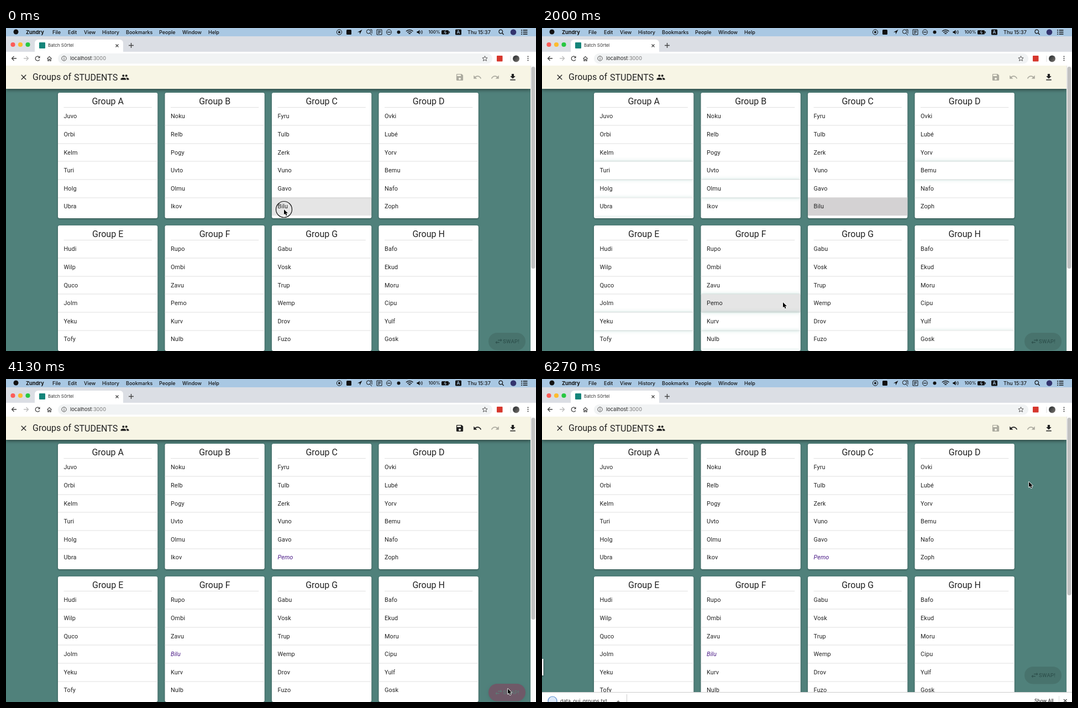
An HTML page with a canvas that plays this animation: 959x584 px, repeating every 6.34 s.

```html
<!DOCTYPE html>
<html lang="en">
<head>
<meta charset="utf-8">
<title>Group swapper</title>
<style>
html, body { margin: 0; width: 100%; height: 100%; overflow: hidden; }
canvas { display: block; }
</style>
</head>
<body>
<canvas id="stage" width="959" height="584"></canvas>
<script>
const LOOP = 6340;
const SELECT_A = 200, SELECT_B = 2350, SWAP = 4000, DOWNLOAD = 5130, SHELF = 5750, SAVE = 5950;
const UI = 'Inter, "Open Sans", sans-serif', APP = 'Roboto, sans-serif';
const INK = '#222', OFF = 'rgba(0,0,0,.3)';
const ctx = document.getElementById('stage').getContext('2d');

const groups = [
  'Juvo Orbi Kelm Turi Holg Ubra', 'Noku Relb Pogy Uvto Olmu Ikov',
  'Fyru Tulb Zerk Vuno Gavo Bilu', 'Ovki Lubé Yorv Bemu Nafo Zoph',
  'Hudi Wilp Quco Jolm Yeku Tofy', 'Rupo Ombi Zavu Pemo Kurv Nulb',
  'Gabu Vosk Trup Wemp Drov Fuzo', 'Bafo Ekud Moru Cipu Yulf Gosk'
].map(s => s.split(' '));
const glowing = { 0: [3, 5], 1: [4], 3: [3], 4: [4], 5: [3, 4, 5], 7: [5] };
const pickA = [2, 5], pickB = [5, 3];

// time, x, y, linear flag for the segment ending here
const track = [
  [0, 503, 328], [250, 503, 328], [730, 501, 329], [1000, 501, 329], [1750, 436, 496],
  [2500, 436, 496], [3010, 775, 466], [3095, 850, 478, 1], [3130, 865, 488, 1], [3500, 908, 560],
  [4250, 908, 560], [4900, 917, 88], [5300, 917, 88], [5600, 904, 83], [5800, 821, 88],
  [5990, 821, 88], [6270, 881, 186], [LOOP, 881, 186]
];
const presses = [[0, 220], [2180, 2360], [3850, 4010], [4980, 5150], [5830, 5960]];

const icons = {
  close: 'M19 6.4L17.6 5 12 10.6 6.4 5 5 6.4 10.6 12 5 17.6 6.4 19 12 13.4 17.6 19 19 17.6 13.4 12z',
  people: 'M5 8a3 3 0 1 0 6 0a3 3 0 1 0-6 0zM13 8a3 3 0 1 0 6 0a3 3 0 1 0-6 0zM8 13c-2.3 0-7 1.2-7 3.5V19h14v-2.5c0-2.3-4.7-3.5-7-3.5zM16 13l-1 .1c1.2.8 2 1.9 2 3.4V19h6v-2.5c0-2.3-4.7-3.5-7-3.5z',
  save: 'M17 3H5a2 2 0 0 0-2 2v14a2 2 0 0 0 2 2h14a2 2 0 0 0 2-2V7zM12 19a3 3 0 1 1 0-6a3 3 0 1 1 0 6zM15 9H5V5h10z',
  undo: 'M12.5 8c-2.6 0-5 1-6.9 2.6L2 7v9h9l-3.6-3.6c1.4-1.2 3.1-1.9 5.1-1.9 3.5 0 6.5 2.3 7.6 5.5l2.4-.8C21 11 17.1 8 12.5 8z',
  load: 'M19 9h-4V3H9v6H5l7 7zM5 18v2h14v-2z',
  swap: 'M7 11l-4 4 4 4v-3h7v-2H7zM21 9l-4-4v3h-7v2h7v3z'
};

const clamp = v => Math.max(0, Math.min(1, v));
const mix = (a, b, k) => a + (b - a) * k;

function cursorAt(t) {
  const i = Math.max(1, track.findIndex(p => p[0] >= t));
  const [t0, x0, y0] = track[i - 1], [t1, x1, y1, linear] = track[i];
  let k = clamp((t - t0) / (t1 - t0));
  if (!linear) k = k * k * (3 - 2 * k);
  return [mix(x0, x1, k), mix(y0, y1, k)];
}

// share of the last moments the pointer spent inside an area, used as a fade
function hover(t, inside) {
  let n = 0;
  for (let d = 0; d < 150; d += 30) if (inside(...cursorAt(Math.max(0, t - d)))) n++;
  return n / 5;
}

function text(s, x, yMid, size, color = INK, family = UI, style = '', align = 'left') {
  ctx.font = `${style} ${size}px ${family}`;
  ctx.textAlign = align;
  ctx.fillStyle = color;
  ctx.fillText(s, x, yMid + size * .36);
}
function box(x, y, w, h, color, r = 0) {
  ctx.fillStyle = color;
  ctx.beginPath();
  ctx.roundRect(x, y, w, h, r);
  ctx.fill();
}
function dot(x, y, r, color) {
  ctx.fillStyle = color;
  ctx.beginPath();
  ctx.arc(x, y, r, 0, 7);
  ctx.fill();
}
function line(d, color = '#333', width = 1.2) {
  ctx.strokeStyle = color;
  ctx.lineWidth = width;
  ctx.stroke(new Path2D(d));
}
function shape(d, color) {
  ctx.fillStyle = color;
  ctx.fill(new Path2D(d));
}
function ring(x, y, r, color, width) {
  line(`M${x - r} ${y}a${r} ${r} 0 1 0 ${2 * r} 0a${r} ${r} 0 1 0 ${-2 * r} 0`, color, width);
}
function icon(name, x, y, color, size = 16.3, flip = 1) {
  ctx.save();
  ctx.translate(x, y);
  ctx.scale(flip * size / 24, size / 24);
  ctx.translate(-12, -12);
  ctx.fillStyle = color;
  ctx.fill(new Path2D(icons[name]), 'evenodd');
  ctx.restore();
}
function shadow(color, blur, dy = 0) {
  ctx.shadowColor = color;
  ctx.shadowBlur = blur;
  ctx.shadowOffsetY = dy;
}

function menuBar() {
  box(0, 0, 959, 15, '#a9c8e3');
  dot(18, 7, 4.5, '#111');
  text('Zundry', 36, 7.5, 9.2, '#111', UI, '700');
  [['File', 84], ['Edit', 112], ['View', 141], ['History', 174], ['Bookmarks', 217],
   ['People', 277], ['Window', 319], ['Help', 366]].forEach(([s, x]) => text(s, x, 7.5, 9, '#111', UI, '500'));
  ring(603, 7.5, 4.6, '#111', 1);
  dot(603, 7.5, 2, '#111');
  box(616, 3, 9, 9, '#111', 1.5);
  shape('M644.5 3L636 7.5h4v4z', '#111');
  ring(656, 6.5, 3.6, '#111', 1);
  line('M658 9l4 4M659 3h3v7', '#111', 1);
  line('M671 3h9v9h-9zM673 5.5h5M673 7.5h5M673 9.5h3', '#111', 1);
  ring(693, 7.5, 4.5, '#111', 1);
  line('M690 7.5h6', '#111');
  dot(710.5, 7.5, 3, '#111');
  line('M724 6a9 9 0 0 1 12.5 0M726.2 8.3a6 6 0 0 1 8 0M728.4 10.4a3 3 0 0 1 3.6 0', '#111', 1.4);
  shape('M743.5 6h2l3-2.6v8.2l-3-2.6h-2z', '#111');
  line('M750 5.5q1.6 2 0 4M752 4q3 3.5 0 7', '#111', 1);
  text('100%', 764.5, 7.5, 7.8, '#111', UI, '500');
  box(788, 4, 13, 7.5, '#111', 1.5);
  box(801.5, 6, 1.5, 3.5, '#111');
  line('M795.5 4.5l-2.5 3.5h3.5l-2 3', '#a9c8e3', 1);
  box(813, 2.5, 11, 10, '#111', 1.5);
  text('A', 818.5, 7.5, 8, '#a9c8e3', UI, '600', 'center');
  text('Thu 15:37', 835, 7.5, 9, '#111', UI, '500');
  ring(895.3, 6.5, 3.3, '#111', 1.2);
  line('M897.6 9l3 3', '#111', 1.4);
  dot(918, 7.5, 5.3, '#33346e');
  line('M932 4h2M935.500 4h8M932 7.500h2M935.500 7.500h8M932 11h2M935.500 11h8', '#111', 1.4);
}

function browser() {
  box(0, 15, 959, 29, '#dbdee4');
  ['#fc5b57', '#fdbc2e', '#28c840'].forEach((c, i) => dot(12.5 + 13.5 * i, 30, 4.1, c));
  box(52, 21, 160, 30, '#fff', 6);
  box(0, 43, 959, 25, '#fff');
  box(60, 26, 11, 11, '#14857a', 1);
  text('Batch S0rtel', 76, 31.5, 8, '#333');
  line('M198.500 29.500l5 5m0-5l-5 5', '#444');
  line('M222 31.500h9M226.500 27v9', '#444', 1.4);
  line('M19 55h-8.500m4-4l-4 4 4 4', '#444', 1.3);
  line('M32 55h8.500m-4-4l4 4-4 4', '#bbb', 1.3);
  line('M60.800 57a4 4 0 1 1-.8-4.700', '#444', 1.3);
  shape('M61.500 50.500v4h-4z', '#444');
  line('M74.500 55.500l4-4 4 4M75.800 55v4.500h1.700v-3h2v3h1.700V55', '#444', 1.1);
  box(94, 46, 786, 18.500, '#f1f3f4', 9.200);
  ring(105, 55, 4.200, '#555', 1);
  line('M105 54.500v3M105 52.300v1.200', '#555', 1.1);
  text('localhost', 116, 55, 9.2, '#222');
  text(':3000', 116 + ctx.measureText('localhost').width, 55, 9.2, '#777');
  line('M866.500 50.700l1.300 3 3.300.3-2.500 2.200.8 3.200-2.900-1.700-2.900 1.700.8-3.200-2.500-2.200 3.300-.3z', '#555', 1);
  box(888, 50, 10.500, 10.500, '#d6362c', 1);
  const g = ctx.createLinearGradient(917, 50, 929, 61);
  g.addColorStop(0, '#262a2d');
  g.addColorStop(1, '#77736f');
  dot(923, 55.500, 6, g);
  line('M913 50v11', '#ddd', 1);
  [51.500, 55, 58.500].forEach(y => dot(944.500, y, 1.1, '#444'));
}

function toolbar(t) {
  shadow('rgba(0,0,0,.5)', 6, 2);
  box(0, 68, 949, 42, '#f7f5e5');
  shadow('transparent', 0);
  icon('close', 32, 89, INK);
  text('Groups of', 48, 88, 16, INK, APP);
  text('STUDENTS', 123, 89, 16, INK, APP);
  icon('people', 215, 89, INK);
  const changed = t >= SWAP, canSave = changed && t < SAVE;
  [['save', 821, canSave], ['undo', 853, changed], ['undo', 885, false, -1], ['load', 917, true]]
    .forEach(([name, x, on, flip]) => {
      const h = on ? hover(t, (cx, cy) => Math.hypot(cx - x, cy - 89) < 16.300) : 0;
      if (h) dot(x, 89, 16.300, `rgba(0,0,0,${.1 * h})`);
      if (name === 'load' && t > DOWNLOAD && t < SAVE - 100) {
        const r = 10 * clamp((t - DOWNLOAD) / 250) + Math.sin((t - 5600) / 400);
        dot(x, 89, Math.max(0, r), 'rgba(0,0,0,.2)');
      }
      icon(name, x, 89, on ? INK : OFF, 16.300, flip);
    });
}

function card(g, t) {
  const x = 94 + 193.500 * (g % 4), y = g < 4 ? 117 : 357, w = 180.300, rowH = 32.600;
  const rowY = i => y + 26.600 + rowH * i;
  const is = (p, i) => p[0] === g && p[1] === i;
  shadow('rgba(0,0,0,.4)', 3, 1);
  box(x, y, w, 227, '#fff', 3);
  shadow('transparent', 0);
  text('Group ' + 'ABCDEFGH'[g], x + w / 2, y + 15, 16, INK, APP, '', 'center');
  box(x + 10.500, y + 26, w - 21, 1, '#e0e0e0');

  for (let i = 0; i < 6; i++) {
    const top = rowY(i);
    const selected = t < SWAP && (is(pickA, i) && t >= SELECT_A || is(pickB, i) && t >= SELECT_B);
    const h = hover(t, (cx, cy) => cx > x && cx < x + w && cy > top && cy < top + rowH);
    if (selected) box(x, top, w, rowH, '#d4d2d3');
    else if (h) box(x, top, w, rowH, `rgba(0,0,0,${.1 * h})`);
    if (i < 5) box(x, Math.round(top + rowH) - .5, w, 1, '#e0e0e0');
  }

  if (t >= SELECT_A && t < SELECT_B) {
    const pulse = Math.sin((t - SELECT_A) / 2000 * Math.PI) ** 2;
    for (const i of glowing[g] || []) {
      ctx.save();
      ctx.beginPath();
      ctx.roundRect(x, y, w, 227, 3);
      ctx.rect(x, rowY(i), w, rowH);
      ctx.clip('evenodd');
      shadow(`rgba(40,135,115,${Math.min(1, .15 + 1.1 * pulse)})`, 6 + 10 * pulse);
      box(x, rowY(i), w, rowH, '#fff');
      ctx.restore();
    }
  }

  ctx.letterSpacing = '.1px';
  groups[g].forEach((name, i) => {
    const other = t < SWAP ? null : is(pickA, i) ? pickB : is(pickB, i) ? pickA : null;
    if (other) text(groups[other[0]][other[1]], x + 10.500, rowY(i) + 15.800, 10.900, '#4a1a86', APP, 'italic');
    else text(name, x + 10.500, rowY(i) + 15.800, 10.900, INK, APP);
  });
  ctx.letterSpacing = '0px';
}

function swapButton(t) {
  const y = t < SHELF ? 566.500 : 535.500;
  const ease = k => 1 - (1 - clamp(k)) ** 2;
  const on = ease((t - SELECT_B) / 250) * (1 - ease((t - SWAP) / 250));
  shadow(`rgba(0,0,0,${.4 * on})`, 6, 2);
  box(873, y - 15.500, 67, 31.500, `rgb(${mix(72, 245, on)},${mix(115, 0, on)},${mix(109, 87, on)})`, 15.700);
  shadow('transparent', 0);
  const v = 255 * on, color = `rgb(${mix(47, 255, on)},${mix(82, 255, on)},${mix(78, 255, on)})`;
  icon('swap', 891.500, y, color, 16);
  ctx.letterSpacing = '.25px';
  text('SWAP!', 899, y, 9.500, color, APP, '500');
  ctx.letterSpacing = '0px';
}

function scrollbar(t) {
  box(949, 68, 10, 516, '#fafafa');
  box(949, 68, 1, 516, '#e6e6e6');
  box(950.500, 70, 7, t < SHELF ? 365 : 321, '#c1c1c1', 3.500);
}

function shelf() {
  box(0, 566, 959, 18, '#fff');
  box(0, 566, 959, 1, '#ccc');
  dot(19, 582, 8, '#dce8f8');
  ring(19, 582, 8, '#5b8fd0', 1.200);
  text('data_oui_groups.txt', 33, 583, 9.200, '#333');
  line('M135 585l3-3 3 3', '#555', 1.200);
  box(153, 570, 1, 14, '#ccc');
  box(935, 573, 1, 11, '#ddd');
  text('Show All', 891, 581.500, 8.400, '#333', UI, '500');
  line('M944 579l5.500 5.500m0-5.500l-5.500 5.500', '#444', 1.300);
}

function downloadFx(t) {
  if (t < 5230) return;
  ctx.save();
  ctx.globalAlpha = clamp((t - 5230) / 150);
  const out = clamp((t - 5900) / 370), x = 10 - 31 * out * (2 - out), y = 502 + 4 * out;
  shadow('rgba(0,0,0,.4)', 3, 1);
  box(x + 1, y, 22.500, 30, '#fafafa');
  shadow('transparent', 0);
  if (out < 1) {
    box(x, y + 5, 2, 20, '#333');
    box(x + 2, y + 1, 20.500, 4, '#16897c');
    for (let i = 0; i < 4; i++) box(x + 5, y + 9 + 4 * i, 13, 1, '#ddd');
    line(`M${x + 17} ${y + 10}q6 2 4 9`, '#d66', 1);
  }
  const fade = 1 - clamp((t - 5680) / 200);
  if (fade) {
    ctx.globalAlpha *= fade;
    ctx.translate(24, 553 + (t - 5600) * .026);
    shadow('rgba(0,0,0,.35)', 5, 1);
    dot(0, 0, 23.500, '#eaedec');
    shadow('transparent', 0);
    shape('M-3-11h6v7h4.500L0 4l-7.500-8H-3z', '#3271c5');
    box(-11, 12, 22, 3, '#2b5ea8');
  }
  ctx.restore();
}

function pointer(t) {
  const [x, y] = cursorAt(t);
  ctx.save();
  ctx.translate(x, y);
  if (presses.some(([a, b]) => t >= a && t < b)) ring(0, 0, 14.500, '#111', 1.200);
  const arrow = 'M0 0V9.600L2.200 7.600 3.800 11.200 5.500 10.500 4 7H7z';
  ctx.lineJoin = 'round';
  line(arrow, '#fff', 1.600);
  shape(arrow, '#000');
  ctx.restore();
}

function draw(t) {
  box(0, 0, 959, 584, '#50817b');
  for (let g = 0; g < 8; g++) card(g, t);
  toolbar(t);
  swapButton(t);
  scrollbar(t);
  menuBar();
  browser();
  if (t >= SHELF) shelf();
  downloadFx(t);
  pointer(t);
}

const start = performance.now();
function tick() {
  draw((performance.now() - start) % LOOP);
  requestAnimationFrame(tick);
}
tick();
</script>
</body>
</html>
```
